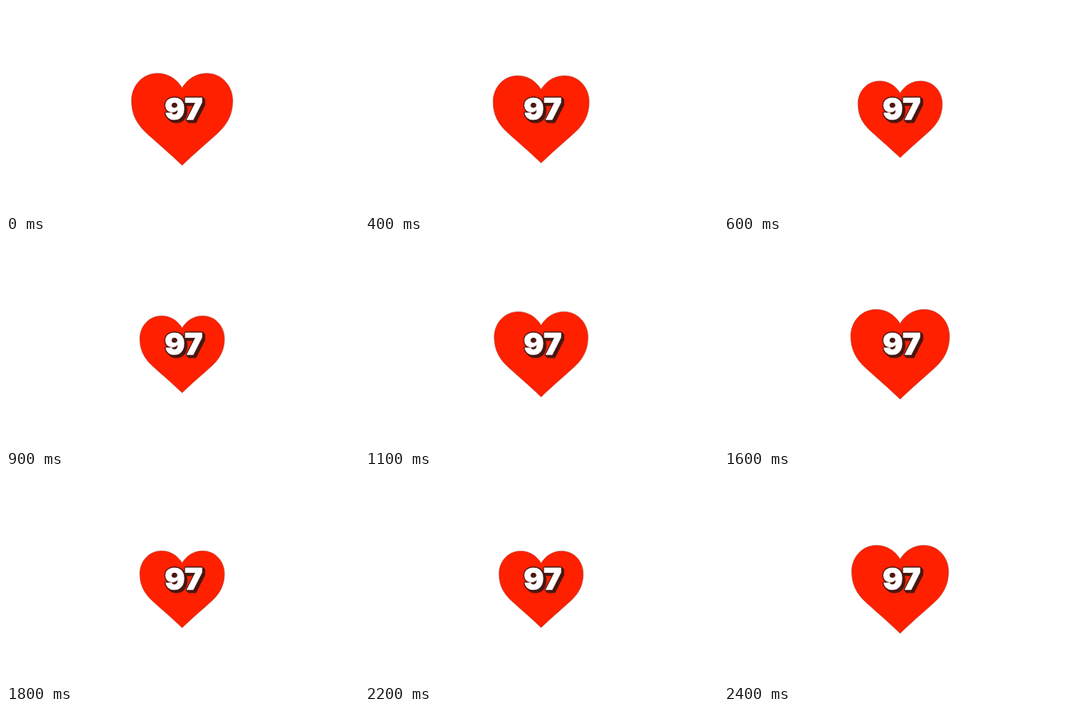
An HTML page that plays this animation: 480 px wide and 282 px high, repeating every 2.5 s.

```html
<!DOCTYPE html>
<html lang="en">
<head>
<meta charset="utf-8">
<title>Beating heart</title>
<style>
  html, body { margin: 0; width: 100%; height: 100%; overflow: hidden; background: #fff; }
  svg { display: block; width: 100vw; height: 100vh; }
  #heart {
    fill: #ff2000;
    stroke: #b8402c;
    stroke-width: 0.7;
    vector-effect: non-scaling-stroke;
  }
  text {
    font: 900 41.5px Inter, "Liberation Sans", sans-serif;
    text-anchor: middle;
    stroke-linejoin: round;
  }
</style>
</head>
<body>
<svg viewBox="0 0 480 282">
  <path id="heart" d="M0-44C-8-57-20-64.2-34.5-64.2C-55-64.2-70.4-47-70.4-26C-70.4-6-62 7.3-50.3 18.3C-36 31.5-18 46.5 0 64C18 46.5 36 31.5 50.3 18.3C62 7.3 70.4-6 70.4-26C70.4-47 55-64.2 34.5-64.2C20-64.2 8-57 0-44Z"/>
  <g id="label"></g>
</svg>
<script>
const LOOP = 2500, STEP = 100, BEAT = 1250, PEAK = 143, FALL = 415;
const FULL = 1, REST = 0.81, REBOUND = 0.012;
const heart = document.getElementById("heart");
const label = document.getElementById("label");

function addText(offset, color, outline) {
  const text = document.createElementNS("http://www.w3.org/2000/svg", "text");
  text.textContent = "97";
  const attributes = {
    x: 241.4 + offset, y: 154.6 + offset,
    fill: color, stroke: color, "stroke-width": outline
  };
  for (const name in attributes) text.setAttribute(name, attributes[name]);
  label.append(text);
}

// Extruded shadow, then the white face.
for (let offset = 3; offset >= 0; offset -= 0.5) addText(offset, "#4a1813", 3.2);
addText(0, "#fff", 0.7);

// A quadratic fall from the peak, then a small rebound, mirrored in time.
function heartScale(time) {
  const phase = (time - PEAK + BEAT) % BEAT;
  const distance = Math.min(phase, BEAT - phase);
  if (distance < FALL) return FULL - (FULL - REST) * (distance / FALL) ** 2;
  const half = BEAT / 2;
  return REST + REBOUND * (1 - ((half - distance) / (half - FALL)) ** 2);
}

function draw(time) {
  const held = Math.floor((time % LOOP) / STEP) * STEP;
  heart.setAttribute("transform", `translate(239.5 154.5) scale(${heartScale(held)})`);
}

const start = performance.now();
function tick() {
  draw(performance.now() - start);
  requestAnimationFrame(tick);
}
tick();
</script>
</body>
</html>
```
